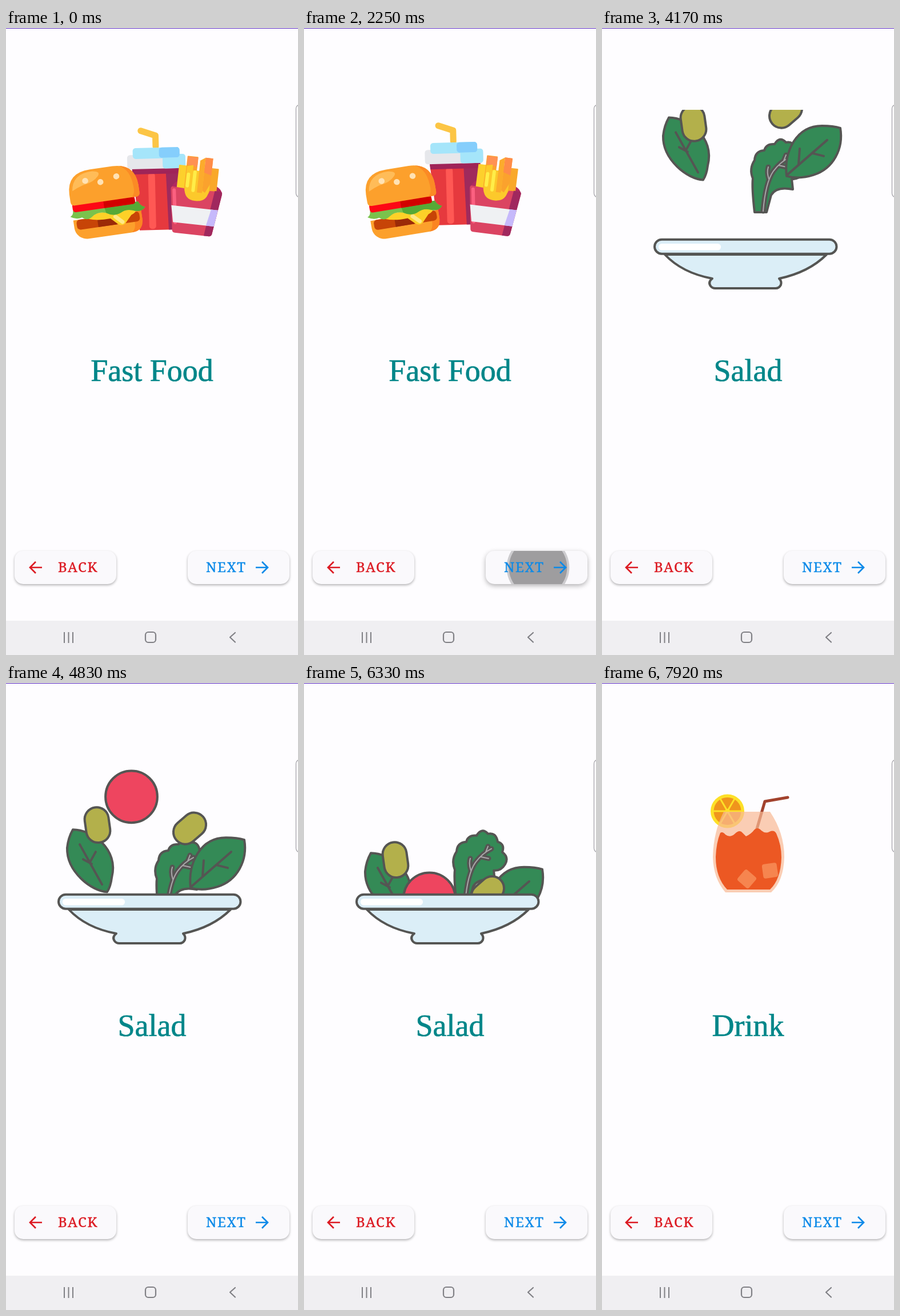
Write an HTML page with a canvas that moves like this. It is 511 by 1096 pixels and loops after 8 s.

```html
<!DOCTYPE html>
<html lang="en">
<head>
<meta charset="utf-8">
<title>Food onboarding</title>
<style>
  html, body { margin: 0; width: 100%; height: 100%; overflow: hidden; background: #fefdff; }
  canvas { display: block; }
</style>
</head>
<body>
<canvas id="stage" width="511" height="1096"></canvas>
<script>
const ctx = document.getElementById('stage').getContext('2d');
const LOOP = 8000;
const TEAL = '#008689', RED = '#dc1a22', BLUE = '#0b8ae8', INK = '#555553';
const BACKDROP = '#fefdff', ICON = '#808085';

// ---- helpers ----
const clamp = (v, lo = 0, hi = 1) => Math.min(hi, Math.max(lo, v));
const smooth = v => { v = clamp(v); return v * v * (3 - 2 * v); };

// Monotone cubic interpolation through [time, value] keys.
function track(keys, t) {
  const n = keys.length - 1;
  if (t <= keys[0][0]) return keys[0][1];
  if (t >= keys[n][0]) return keys[n][1];
  const slope = i => (keys[i + 1][1] - keys[i][1]) / (keys[i + 1][0] - keys[i][0]);
  const tangent = i => {
    if (i === 0) return slope(0);
    if (i === n) return 0;
    const a = slope(i - 1), b = slope(i);
    return a * b <= 0 ? 0 : 2 * a * b / (a + b);
  };
  let i = 0;
  while (t > keys[i + 1][0]) i++;
  const h = keys[i + 1][0] - keys[i][0], u = (t - keys[i][0]) / h, w = 1 - u;
  return keys[i][1] * (1 + 2 * u) * w * w + h * tangent(i) * u * w * w
    + keys[i + 1][1] * u * u * (3 - 2 * u) - h * tangent(i + 1) * u * u * w;
}

function group(draw) { ctx.save(); draw(); ctx.restore(); }

function path(d, fill, stroke, width = 4) {
  const p = new Path2D(d);
  if (fill) { ctx.fillStyle = fill; ctx.fill(p); }
  if (stroke) {
    ctx.strokeStyle = stroke;
    ctx.lineWidth = width;
    ctx.lineCap = ctx.lineJoin = 'round';
    ctx.stroke(p);
  }
}

function box(x, y, w, h, r, fill, stroke, width = 4) {
  ctx.beginPath();
  ctx.roundRect(x, y, w, h, r);
  if (fill) { ctx.fillStyle = fill; ctx.fill(); }
  if (stroke) { ctx.strokeStyle = stroke; ctx.lineWidth = width; ctx.stroke(); }
}

function disc(x, y, r, fill, stroke) {
  box(x - r, y - r, 2 * r, 2 * r, r, fill, stroke);
}

function pivot(x, y, dx, dy, degrees, stretch = 1) {
  ctx.translate(x + dx, y + dy);
  ctx.scale(1, stretch);
  ctx.rotate(degrees * Math.PI / 180);
  ctx.translate(-x, -y);
}

// ---- fast food ----
function cup() {
  path('M241 186L266.5 195V214', null, '#fcc545', 11);
  path('M224 250H313L303 360H235Z', '#e6393e');
  path('M283 250H313L303 360H286Z', '#9f2a5c');
  box(252, 260, 12, 98, 5, '#ff5854');
  path('M224 250H312V262H225Z', '#9f2458');
  box(216, 228, 102, 25, 5, '#e6e7eb');
  box(278, 228, 40, 25, 5, '#a5e5fa');
  box(226, 216, 82, 19, 5, '#a5e5fa');
  box(272, 216, 36, 18, 5, '#85cefc');
}

function burger() {
  box(129, 332, 120, 36, [0, 0, 22, 22], '#fca02c');
  path('M232 332H249V346Q249 368 228 368Q240 360 232 332Z', '#fb8522');
  box(134, 332, 111, 18, 6, '#c74407');
  box(171, 336, 33, 14, 0, '#9b2a08');
  path('M143 325H243Q241 334 231 337L219 350Q213 355 206 350L194 338Q160 340 143 325Z', '#fdd128');
  path('M203 336L214 347', null, '#ffe887', 7);
  path('M131 315H246Q250 325 257 326Q251 334 239 331Q225 324 214 330Q201 336 188 327Q174 322 163 330Q153 337 145 329Q135 332 125 325Q131 322 131 315Z', '#7ac24c');
  path('M186 315H246Q250 325 257 326Q251 334 239 331Q225 324 214 330Q201 336 188 327Z', '#56a936');
  box(131, 302, 110, 16, 5, '#fd0715');
  box(186, 306, 55, 12, [0, 4, 4, 0], '#d20000');
  path('M129 299V285Q130 246 171 246H211Q250 247 251 285V299Q251 306 244 306H136Q129 306 129 299Z', '#fca02c');
  path('M222 247Q250 253 251 285V299Q251 306 244 306H236Q244 300 242 285Q241 257 222 247Z', '#fb8a25');
  path('M135 280Q139 249 174 250Q190 252 183 260Q174 270 155 272Q145 275 135 280Z', '#ffbc58');
  for (const [x, y] of [[160, 265], [186, 271], [215, 265]]) disc(x, y, 5.3, '#ffe2b4');
}

function fries() {
  path('M276 291Q283 272 300 277H345Q362 280 366 291L355 330H284Z', '#b02861');
  box(286, 249, 15, 50, 1, '#fdd02c');
  box(342, 249, 14, 48, 1, '#f9a82a');
  box(299, 232, 19, 66, 1, '#fba22d');
  path('M300 233H318V250L300 247Z', '#ff9153');
  path('M276 292Q276 287 281 288L299 289Q303 309 321 309Q338 309 344 289L362 288Q367 288 366 294L356 364Q355 368 351 368H291Q287 368 286 364Z', '#db4462');
  path('M353 288H363Q367 289 366 294L356 364Q355 368 351 368H342Z', '#a0285e');
  path('M282 294L290 350', null, '#fb6080', 6);
  path('M280 321H362L358 350H286Z', '#eff1f3');
  path('M350 321H362L358 350H344Z', '#c6b9fb');
  path('M300 250L311 247V256H323V249H343V287Q342 309 321 309Q300 309 300 287Z', '#fcc92b');
  path('M322 238L331 232V294H322Z', '#fcab2c');
  path('M331 232H344V276L336 293L331 290Z', '#fba22d');
  path('M331 232H344V262L331 258Z', '#ff8c48');
  path('M304 264V284M315 259V291', null, '#ffed48', 6);
}

const SPREAD = [[0, 1], [250, 1.3], [880, 0], [1740, 0], [2120, 1.3], [2600, .4]];
const LIFT = [[0, 1], [270, 2.4], [880, 0], [1740, 0], [2140, 2.6], [2600, .5]];

function fastFood(t) {
  const a = track(SPREAD, t), lift = track(LIFT, t);
  group(() => { pivot(267, 360, -a, -7 * lift, -1.4 * a); cup(); });
  group(() => { pivot(189, 350, -9.3 * a, -4.6 * a, -8.4 * a, 1 - .02 * a); burger(); });
  group(() => { pivot(321, 368, 4 * a, -7 * a, 6.2 * a); fries(); });
}

// ---- salad ----
const GREEN = '#348a56', OLIVE = '#b3b04b';

function leftLeaf() {
  path('M117 300C150 300 198 334 185 384Q183 400 177 409C150 408 106 374 107 332Q109 314 117 300Z', GREEN, INK);
  path('M129 326L168 396M157 339L147 357M135 352L150 360', null, INK);
}

function rightLeaf() {
  path('M417 326C423 362 405 397 370 408Q345 416 323 410C318 367 340 322 385 322Q405 322 417 326Z', GREEN, INK);
  path('M325 407L394 347M346 362L344 389M368 370L388 375', null, INK);
}

function lettuce() {
  path('M267 392Q262 348 264 333Q257 316 267 301Q268 285 284 284Q287 272 302 273Q311 258 322 270Q336 267 339 284Q352 288 347 302Q359 311 352 323Q345 335 332 334L334 352Q305 346 296 362L288 392Z', GREEN, INK);
  const veins = 'M282 390Q286 340 300 320Q312 304 328 296M292 334Q288 322 291 313M309 310L323 313M318 302L322 292';
  path(veins, null, INK, 9);
  path(veins, null, '#aaa5a9', 2);
}

function olive(x, y, degrees) {
  pivot(x, y, 0, 0, degrees);
  box(x - 21, y - 31, 42, 62, 21, OLIVE, INK);
}

// Vertical offset of each ingredient from where it comes to rest, back to front.
const INGREDIENTS = [
  [lettuce, [[3340, -255], [4450, -25], [4830, 9], [5250, 30], [5670, 26], [6180, -9], [6600, 0]]],
  [leftLeaf, [[3350, -270], [4830, -44], [5250, 16], [5670, 8], [6150, -5], [6550, 0]]],
  [rightLeaf, [[3400, -272], [4830, -52], [5300, 10], [5670, 1], [6000, -3], [6400, 0]]],
  [() => disc(219.5, 373.7, 45.4, '#ee455f', INK), [[4130, -285], [4830, -175], [5000, -148], [5670, -54], [6100, 8], [6500, 0]]],
  [() => olive(160, 312, -8), [[3650, -205], [4830, -64], [5320, 16], [5670, 8], [6150, -5], [6550, 0]]],
  [() => olive(321.5, 365, 49), [[3950, -255], [4830, -111], [5670, -7], [6000, 6], [6400, 0]]],
];

function bowl() {
  path('M110 396Q140 428 193 438Q185 444 190 451Q193 455 198 455H304Q310 455 313 449Q315 443 310 438Q362 427 393 396Z', '#dbeef7', INK);
  box(92, 369.7, 318.5, 25, 12.5, '#dbeef7', INK);
  box(99, 377, 109, 11.5, 5.5, '#fff');
}

function salad(t) {
  group(() => {
    ctx.beginPath();
    ctx.rect(41, 143, 420, 240);
    ctx.clip();
    for (const [draw, keys] of INGREDIENTS) {
      group(() => { ctx.translate(0, track(keys, t)); draw(); });
    }
  });
  bowl();
}

// ---- drink ----
function lemon() {
  disc(219.5, 224, 29.5, '#fde028');
  disc(219.5, 224, 24, '#f0951c');
  for (let i = 0; i < 3; i++) {
    group(() => {
      pivot(219.5, 224, 0, 0, i * 60);
      path('M195.5 224H243.5', null, '#fde028', 3);
    });
  }
  disc(219.5, 224, 4, '#fde028');
}

function iceCube(x, y, degrees) {
  group(() => {
    pivot(x, y, 0, 0, degrees);
    box(x - 13, y - 12.5, 26, 25, 4, '#f6854f');
  });
}

function drink(t) {
  const sway = Math.sin((t - 7920) / 260);
  lemon();
  path('M271 255L285 207L325 200', null, '#a2422d', 5);
  path('M213 225H294Q319 262 319 304Q318 346 296 366H216Q195 342 194 304Q195 260 213 225Z', 'rgba(249,186,149,.7)');
  group(() => {
    ctx.translate(0, sway);
    path('M207 262Q211 259 216 265Q224 271 232 264Q241 255 246 262L252 268Q261 264 267 256Q273 251 279 258Q286 264 293 260Q301 256 305 263Q314 283 314 305Q313 343 294 361H219Q199 340 199 304Q200 279 207 262Z', '#ec5823');
  });
  iceCube(253.5, 342.5 + sway, 41);
  iceCube(294, 328 - sway, -8);
}

// ---- interface ----
function text(string, x, y, color, weight) {
  ctx.fillStyle = ctx.strokeStyle = color;
  ctx.lineWidth = weight;
  ctx.lineJoin = 'round';
  ctx.fillText(string, x, y);
  ctx.strokeText(string, x, y);
}

function label(string, x, color) {
  ctx.font = '24px "Noto Serif", serif';
  ctx.letterSpacing = '1.7px';
  ctx.textAlign = 'left';
  text(string, x, 951, color, .4);
  ctx.letterSpacing = '0px';
}

function title(string) {
  ctx.font = '54px "Liberation Serif", serif';
  ctx.textAlign = 'center';
  text(string, 255.5, 617, TEAL, .7);
}

function button(x, press) {
  group(() => {
    ctx.shadowColor = 'rgba(0,0,0,.3)';
    ctx.shadowBlur = 4 + 5 * press;
    ctx.shadowOffsetY = 2 + press;
    box(x, 914, 178, 58, 15, '#faf9fc');
  });
}

function arrow(x, direction, color) {
  group(() => {
    ctx.translate(x, 943);
    ctx.scale(direction, 1);
    ctx.strokeStyle = color;
    ctx.lineWidth = 2.7;
    ctx.lineCap = 'butt';
    ctx.lineJoin = 'miter';
    ctx.stroke(new Path2D('M-11 0H10M0 -10L10 0L0 10'));
  });
}

const TAPS = [2180, 6890], TAP_LENGTH = 420;

function ripple(age) {
  const r = 40 + age * .21;
  group(() => {
    ctx.beginPath();
    ctx.roundRect(318, 914, 178, 58, 15);
    ctx.clip();
    ctx.globalAlpha *= 1 - smooth((age - 240) / 180);
    disc(409.5, 943, r, 'rgba(0,0,0,.18)');
    disc(409.5, 943, r - 4, 'rgba(0,0,0,.23)');
  });
}

function screen(name, art, t, tappable) {
  const tap = tappable && TAPS.find(start => t >= start && t < start + TAP_LENGTH);
  art(t);
  title(name);
  button(15, 0);
  button(318, tap ? 1 : 0);
  if (tap) ripple(t - tap);
  label('BACK', 91, RED);
  label('NEXT', 350, BLUE);
  arrow(52, -1, RED);
  arrow(448, 1, BLUE);
}

function chrome() {
  box(0, 0, 511, 1, 0, '#5b2cc4');
  box(507.5, 134, 20, 162, 7, '#fefdff', '#a5a4a9', 1.3);
  box(0, 1036, 511, 60, 0, '#f0eff2');
  for (const x of [102, 109.5, 117]) box(x - 1, 1056, 2, 19, 0, ICON);
  box(244, 1056, 18, 18, 5, null, ICON, 2.2);
  path('M401 1057L392 1065L401 1073.5', null, ICON, 2.2);
}

const SCREENS = [
  ['Fast Food', fastFood, -1000],
  ['Salad', salad, 2430],
  ['Drink', drink, 7230],
];
const SWITCH = 230, SHIFT = 60;

function render(t) {
  ctx.fillStyle = BACKDROP;
  ctx.fillRect(0, 0, 511, 1096);
  SCREENS.forEach(([name, art, start], i) => {
    const enter = smooth((t - start) / SWITCH);
    const next = SCREENS[i + 1];
    const leave = next ? smooth((t - next[2]) / SWITCH) : 0;
    if (enter === 0 || leave === 1) return;
    group(() => {
      ctx.globalAlpha = enter * (1 - leave);
      ctx.translate((1 - enter - leave) * SHIFT, 0);
      screen(name, art, t, enter === 1);
    });
  });
  chrome();
}

const begin = performance.now();
function tick() {
  render((performance.now() - begin) % LOOP);
  requestAnimationFrame(tick);
}
tick();
</script>
</body>
</html>
```
